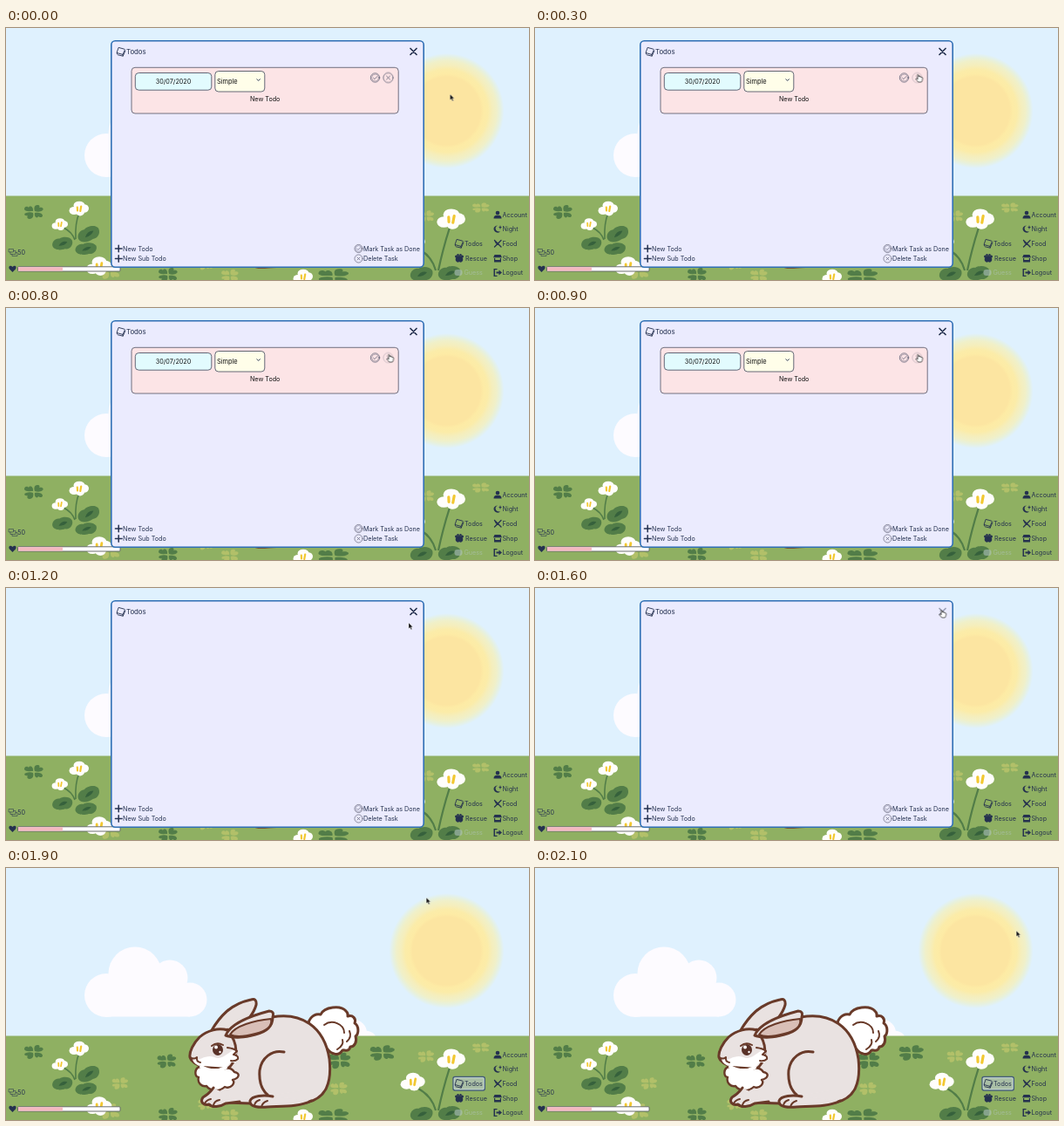
An HTML page for the animation above (2200 ms loop, 600x289 px).

```html
<!DOCTYPE html>
<html lang="en">
<head>
<meta charset="utf-8">
<title>Todo list</title>
<style>
  html, body { margin: 0; width: 100%; height: 100%; overflow: hidden; background: #dff1fe; }
  svg { display: block; width: 600px; height: 289px; }
  text { font: 7.2px Inter, "Open Sans", sans-serif; fill: #25314f; }
  .card text { fill: #111; }
  .line { fill: none; stroke: #25314f; stroke-linecap: round; stroke-linejoin: round; }
  .fur { stroke: #693a29; stroke-width: 3; stroke-linecap: round; stroke-linejoin: round; }
  .fine { fill: none; stroke-width: 2; }
  .ring { fill: none; stroke: #66667a; stroke-width: .8; stroke-linecap: round; stroke-linejoin: round; }

  .modal, .card, .trash, .close, .focus, .todo-focus, .cursor, .arrow, .hand, .edge {
    animation: 2200ms step-end infinite;
  }
  .modal { animation-name: modal; }
  .card { animation-name: card; }
  .trash { animation-name: trash; }
  .close { animation-name: close; }
  .focus { animation-name: focus; }
  .edge { animation-name: edge; }
  .todo-focus { animation-name: todo-focus; }
  .cursor { animation-name: move; }
  .arrow { animation-name: arrow; }
  .hand { animation-name: hand; }

  @keyframes modal { 0% { visibility: visible } 86.36%, 100% { visibility: hidden } }
  @keyframes todo-focus { 0% { opacity: 0 } 86.36%, 100% { opacity: 1 } }
  @keyframes card { 0% { opacity: 1 } 45.45%, 100% { opacity: 0 } }
  @keyframes trash { 0% { opacity: 1 } 13.63%, 100% { opacity: .35 } }
  @keyframes close { 0% { opacity: 1 } 59.09%, 100% { opacity: .4 } }
  @keyframes focus { 0% { opacity: 0 } 77.27%, 100% { opacity: 1 } }
  @keyframes edge { 0% { stroke: #2f6fb4 } 77.27%, 100% { stroke: #3a4768 } }
  @keyframes arrow {
    0% { opacity: 1 } 13.63% { opacity: 0 } 50% { opacity: 1 }
    59.09% { opacity: 0 } 86.36%, 100% { opacity: 1 }
  }
  @keyframes hand {
    0% { opacity: 0 } 13.63% { opacity: 1 } 50% { opacity: 0 }
    59.09% { opacity: 1 } 86.36%, 100% { opacity: 0 }
  }
  @keyframes move {
    0% { transform: translate(509.5px, 76px) }
    4.54% { transform: translate(479px, 67px) }
    9.09% { transform: translate(448px, 58px) }
    13.63% { transform: translate(438.5px, 53px) }
    50% { transform: translate(451px, 46px) }
    54.54% { transform: translate(462px, 40px) }
    59.09% { transform: translate(465.5px, 25px) }
    86.36% { transform: translate(482.3px, 34px) }
    90.9% { transform: translate(520px, 53px) }
    95.45%, 100% { transform: translate(552.3px, 72px) }
  }
</style>
</head>
<body>
<svg viewBox="0 0 600 289">
  <defs>
    <radialGradient id="sun">
      <stop offset=".59" stop-color="#fce5a1"/>
      <stop offset=".64" stop-color="#fdeba5"/>
      <stop offset=".72" stop-color="#fbeca9"/>
      <stop offset=".79" stop-color="#f5eebc"/>
      <stop offset=".87" stop-color="#f0f0c9"/>
      <stop offset=".93" stop-color="#e7f1de"/>
      <stop offset="1" stop-color="#dff1fe"/>
    </radialGradient>
    <g id="clover">
      <path d="M-1-1C-4-1-10 0-11-3C-11-7-7-7-6-5C-5-8 0-6-1-1Z"/>
      <path d="M1-1C0-4 0-8 4-8C7-8 7-6 6-5C9-6 12-4 10-2C8 0 4 0 1-1Z"/>
      <path d="M1 1C4 0 10 1 10 4C10 7 6 6 5 5C4 8 0 6 1 1Z"/>
      <path d="M-1 1C0 4-1 8-5 8C-8 8-8 5-7 4C-11 5-12 2-9 1C-6 0-3 0-1 1Z"/>
    </g>
    <g id="flower">
      <g fill="#fffefb">
        <ellipse cx="-6" cy="2.5" rx="5.5" ry="4.5"/>
        <ellipse cx="5.5" cy="0" rx="5.5" ry="4.8"/>
        <ellipse cx="0" cy="-3.5" rx="6.5" ry="4.8"/>
        <ellipse cx="1" cy="4" rx="5" ry="4.4"/>
      </g>
      <path d="M-2 2.5L-2.2-1.5M1.2 3L2.2-2.5" fill="none" stroke="#f2c832" stroke-width="2.2" stroke-linecap="round"/>
    </g>
    <g id="leaf">
      <path d="M-13 3C-14-2-9-7-4-6C0-9 9-9 12-4C14 1 10 8 3 7C-2 9-11 9-13 3Z" fill="#527d48"/>
      <path d="M-5 3Q-1-4 6-2Q3 3-5 3Z" fill="#36613c"/>
    </g>
    <g id="done"><circle r="5.2"/><circle r="3.9" stroke-width=".5"/><path d="M-2 .2L-.5 1.7L2.2-1.4"/></g>
    <g id="drop"><circle r="5.2"/><path d="M-1.8-1.8L1.8 1.8M1.8-1.8L-1.8 1.8"/></g>
    <path id="plus" d="M-3.8 0H3.8M0-3.8V3.8" stroke-width="1.5"/>
    <g id="book" stroke-width=".9">
      <path d="M-2.5-4.5L3.8-2.8Q4.6-2.4 4.2-1.6L2 3.4L-4.6 1.6Z"/>
      <path d="M-4.6 1.6Q-5.2 3.2-3.6 3.8L2.2 5.2L4.8-.8M2 3.4L2.2 5"/>
    </g>
  </defs>

  <rect width="600" height="289" fill="#dff1fe"/>
  <circle cx="505.5" cy="95" r="66" fill="url(#sun)"/>
  <g fill="#fdfbff">
    <circle cx="115" cy="146" r="25"/>
    <circle cx="148" cy="121" r="30.5"/>
    <circle cx="188" cy="126" r="20.5"/>
    <circle cx="211" cy="151" r="19.5"/>
    <rect x="115" y="135" width="96" height="35.5"/>
    <circle cx="399" cy="189" r="15"/>
    <ellipse cx="411" cy="194" rx="13" ry="7.5"/>
  </g>
  <rect y="192.5" width="600" height="97" fill="#8fb062"/>

  <g fill="#527d48">
    <use href="#clover" transform="translate(32 211)"/>
    <use href="#clover" transform="translate(184.5 221.5)"/>
    <use href="#clover" transform="translate(432 212) scale(1.3 1.1)"/>
    <use href="#clover" transform="translate(383 221) scale(1.15)"/>
    <use href="#clover" transform="translate(186 283)"/>
    <use href="#clover" transform="translate(376 285) scale(1.6 1.1)"/>
  </g>
  <g fill="#b2c069">
    <use href="#clover" transform="translate(131 247) scale(.85)"/>
    <use href="#clover" transform="translate(545 206) scale(.9 .7)"/>
    <use href="#clover" transform="translate(482 216) scale(.85)"/>
    <use href="#clover" transform="translate(382 253) scale(.9)"/>
    <use href="#clover" transform="translate(119 279) scale(1.1)"/>
    <use href="#clover" transform="translate(229 271) scale(.8)"/>
    <use href="#clover" transform="translate(257 284) scale(.9)"/>
  </g>
  <g fill="none" stroke="#527d48" stroke-width="1.6">
    <path d="M84 212Q79 224 80 242M66 229Q76 234 79 243"/>
    <path d="M509 229Q502 250 496 278M471 252Q488 260 493 278" stroke-width="2.2"/>
  </g>
  <use href="#leaf" transform="translate(65 247) scale(.9)"/>
  <use href="#leaf" transform="translate(95 236) rotate(-15)"/>
  <use href="#leaf" transform="translate(92 253) scale(.95 .85)"/>
  <use href="#leaf" transform="translate(477 282)"/>
  <use href="#leaf" transform="translate(509 281)"/>
  <use href="#flower" transform="translate(84 207)"/>
  <use href="#flower" transform="translate(62 225) scale(.82)"/>
  <use href="#flower" transform="translate(107 273) scale(1.3)"/>
  <use href="#flower" transform="translate(341 285)"/>
  <use href="#flower" transform="translate(511 219) scale(1.45 1.4)"/>
  <use href="#flower" transform="translate(467 245) scale(1.25)"/>

  <g class="fur" fill="#e9e2e1">
    <path d="M347 184C345 175 352 166 361 168C365 159 384 157 390 164Q393 167 392 170C398 168 402 173 400 178C405 181 405 190 401 193C403 199 400 205 395 205C393 212 388 208 386 209C382 216 374 214 369 208Z" fill="#fff"/>
    <path d="M365 180C374 173 388 179 388 189M380 208Q388 203 386 197M391 199Q397 194 394 187" class="fine"/>
    <path d="M236 186C245 171 257 156 281 151Q288 149 287 157C284 168 275 177 267 185Z"/>
    <path d="M250 188C265 181 283 176 305 171C338 165 365 181 371 219C374 247 367 264 345 269C320 274 280 269 250 269C235 262 235 245 244 233Z"/>
    <path d="M254 186C244 183 231 186 222 194C215 201 210 211 211 217C213 224 222 226 230 231L250 233C265 225 270 205 254 186Z"/>
    <path d="M214 220C222 222 229 213 239 217C248 221 254 212 262 208L265 213L262 215Q268 217 265 221Q262 225 258 222C253 231 243 232 236 231C226 229 217 227 214 220Z" fill="#fff" stroke="none"/>
    <path d="M254 206Q262 207 265 210L261 214Q267 215 266 219Q263 222 258 221" class="fine"/>
    <path d="M222 228C216 230 216 239 221 240C219 247 225 251 230 250C235 257 246 256 251 251C258 254 264 246 260 243C268 241 269 235 262 234Q258 228 251 230Z" fill="#fff" stroke-width="2.4"/>
    <path d="M224 228Q238 236 252 229" fill="none" stroke="#fff" stroke-width="4"/>
    <path d="M252 192C257 180 275 171 302 164Q308 164 306 171C306 182 299 188 286 191C274 194 264 196 252 192Z"/>
    <path d="M257 191C263 181 284 175 304 173C306 182 298 187 286 190C275 193 265 195 257 191Z" fill="#d9bfb7" stroke-width="2"/>
    <path d="M238 252C234 258 231 260 226 263C222 268 227 273 233 271C236 275 246 274 252 270L268 268"/>
    <path d="M228 270Q230 266 235 265M238 272Q239 267 245 266" class="fine"/>
    <path d="M347 269C325 274 307 271 304 261L340 255Z" stroke="none"/>
    <path d="M306 262C296 260 282 261 280 267C279 274 290 275 300 274C315 273 337 274 350 267"/>
    <path d="M285 273Q285 268 291 266M293 274Q294 269 300 267" class="fine"/>
    <path d="M319 211C305 208 293 218 291 232C290 245 293 254 300 260" fill="none"/>
    <path d="M211 217Q216 220 219 217M219 217Q218 222 223 223" class="fine"/>
  </g>
  <ellipse cx="243" cy="208.5" rx="6" ry="6.5" fill="#593127"/>
  <circle cx="241" cy="205.5" r="2" fill="#fff"/>
  <circle cx="245.5" cy="211" r="1.2" fill="#fff"/>
  <path d="M236 204Q242 199 249 203" class="fur fine"/>

  <path class="line" d="M3.5 253.5H8.5V257H3.5ZM5 257V259.5H11V255.5H8.5M7 259.5V261.5H13V257.5H11" stroke-width=".7" opacity=".75"/>
  <text x="13.2" y="259.7">50</text>
  <path d="M7.5 280L4 276.5C2 273.5 5.3 271.5 7.5 274C9.7 271.5 13 273.5 11 276.5Z" fill="#25314f"/>
  <rect x="13.5" y="273.8" width="117.5" height="5.2" rx="1" fill="#fff" stroke="#5c6064" stroke-width=".9"/>
  <rect x="14" y="274.2" width="51" height="4.4" fill="#f4b9c0"/>

  <g class="todo-focus">
    <rect x="513" y="239.5" width="36.3" height="15.5" rx="2" fill="#aabfa6" stroke="#445c79" stroke-width="1.4"/>
    <rect x="514.2" y="240.7" width="33.9" height="13.1" rx="1" fill="none" stroke="#cbdcdc" stroke-width=".8"/>
  </g>
  <use href="#book" class="line" transform="translate(520 247)"/>
  <text x="526" y="249.6">Todos</text>
  <g fill="#25314f">
    <path d="M520 261C523 261 525 264 524 267Q522 270 520 268Q518 270 516 267C515 264 517 261 520 261Z"/>
    <circle cx="516.5" cy="262" r="1.5"/><circle cx="523.5" cy="262" r="1.5"/>
    <circle cx="518.5" cy="260.3" r="1.2"/><circle cx="521.5" cy="260.3" r="1.2"/>
    <circle cx="564" cy="212" r="2.3"/>
    <path d="M559.5 218.5Q559.5 214.8 563 214.8H565Q568.5 214.8 568.5 218.5Z"/>
    <path d="M564 226.5C560 228 561 234 567 233.5C563 237 558 232 560 228.5Q561.5 226.5 564 226.5Z"/>
    <path d="M567 226L567.6 228L569 228.6L567.6 229.2L567 231L566.4 229.2L565 228.6L566.4 228Z"/>
    <path d="M560.5 260H567.5L569 263.3H559ZM560 264H561.2V266H566.8V264H568V268.5H560Z"/>
    <path d="M559.5 276H563.5V277.2H561V283.8H563.5V285H559.5ZM562.5 279.4H565.5V277.4L569 280.5L565.5 283.6V281.6H562.5Z"/>
  </g>
  <path class="line" d="M560.5 243.5L568 251M568 243.5L560.5 251M560.5 243.5L562.5 247" stroke-width="1.3"/>
  <text x="527" y="266.6">Rescue</text>
  <g opacity=".5">
    <rect x="514.5" y="277" width="9" height="7" rx="3" fill="#b9c9cf"/>
    <text x="525.5" y="282.8" style="fill:#b9c9cf">Guess</text>
  </g>
  <text x="569.5" y="217.1">Account</text>
  <text x="569.5" y="233.3">Night</text>
  <text x="569.5" y="249.8">Food</text>
  <text x="569.5" y="266.6">Shop</text>
  <text x="569.5" y="283.1">Logout</text>

  <g class="modal">
    <rect class="edge" x="120.8" y="14.8" width="358.4" height="259.4" rx="4.5" fill="#ebebfe" stroke-width="1.6"/>
    <use href="#book" class="line" transform="translate(132 27)"/>
    <text x="138" y="29.9" style="font-size:7.8px">Todos</text>
    <path class="line close" d="M464 23.5L471 30.5M471 23.5L464 30.5" stroke-width="1.7"/>
    <rect class="focus" x="456.5" y="15.3" width="22.5" height="22.5" rx="1" fill="none" stroke="#3972b2" stroke-width="1.2"/>

    <g class="card">
      <rect x="144" y="45.3" width="306.2" height="52.7" rx="4" fill="#fce4e6" stroke="#626273" stroke-width=".9"/>
      <g stroke="#53586a" stroke-width=".9">
        <rect x="148.3" y="51.5" width="87.5" height="19.7" rx="4" fill="#e2fbfe"/>
        <rect x="239.8" y="49.5" width="57" height="23.5" rx="4" fill="#fffee9"/>
      </g>
      <text x="192" y="64" text-anchor="middle">30/07/2020</text>
      <text x="242" y="64" style="font-size:7.4px">Simple</text>
      <path class="line" d="M287.8 58.7L289.6 60.4L291.4 58.7" stroke-width=".9"/>
      <text x="297.2" y="84" text-anchor="middle">New Todo</text>
      <use href="#done" class="ring" x="423.5" y="57"/>
      <g class="trash"><use href="#drop" class="ring" transform="translate(438.5 57) scale(1.08)"/></g>
    </g>

    <use href="#plus" class="line" x="129.2" y="253"/>
    <text x="134" y="255.6">New Todo</text>
    <use href="#plus" class="line" x="129.2" y="264.5"/>
    <text x="134" y="267.1">New Sub Todo</text>
    <use href="#done" class="ring" transform="translate(404.5 253) scale(.88)"/>
    <text x="410" y="255.6">Mark Task as Done</text>
    <use href="#drop" class="ring" transform="translate(404.5 264.5) scale(.88)"/>
    <text x="410" y="267.1">Delete Task</text>
  </g>

  <g class="cursor">
    <path class="arrow" d="M0 0V6.6L1.5 5.2L2.7 7.8L3.8 7.3L2.6 4.8H4.6Z" fill="#111" stroke="#fff" stroke-width=".3"/>
    <path class="hand" d="M0 .8Q.7-.2 1.4.8L2 3.2Q3-.1 3.8 3.4Q4.8 2.6 5.1 3.9Q6.1 3.3 6.2 4.8L5.8 7.2L4.9 9H1.2L-1.4 5.8Q-1.6 4.5-.3 5L.7 5.7Z" fill="#fff" stroke="#222" stroke-width=".7" stroke-linejoin="round"/>
  </g>
</svg>
</body>
</html>
```
